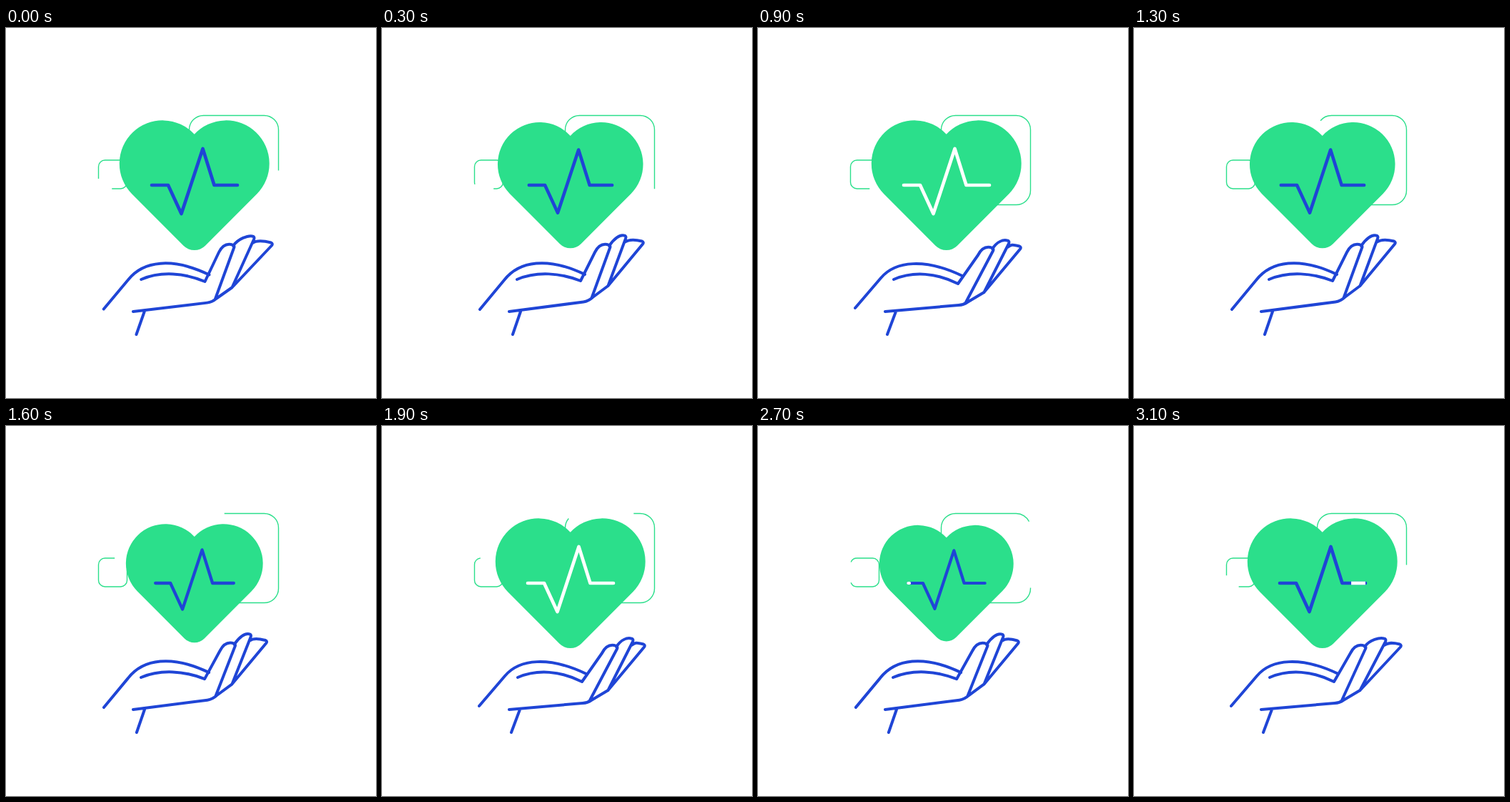
Recreate the animation shown at these times as an HTML page. Size 518x518 px, loop 3.2 s.

```html
<!DOCTYPE html>
<html lang="en">
<head>
<meta charset="utf-8">
<title>Heart in hand</title>
<style>
  html, body { margin: 0; width: 100%; height: 100%; overflow: hidden; background: #fff; }
  svg { display: block; width: 100%; height: 100%; }
  path { fill: none; stroke-linecap: round; stroke-linejoin: round; }
  .frame { stroke: #2bdf8b; stroke-width: 1.4; stroke-dasharray: 80 20; stroke-linecap: butt; }
  #shape { fill: #2bdf8b; }
  .pulse { stroke-width: 4.7; }
  #pulse, #hand { stroke: #1f45d6; }
  #glow { stroke: #fff; }
  #hand { stroke-width: 4; }
</style>
</head>
<body>
<svg viewBox="0 0 518 518">
  <path id="big" class="frame" pathLength="100"
    d="M256.5 142.5a20 20 0 0 1 20-20h85a20 20 0 0 1 20 20v85a20 20 0 0 1-20 20h-85a20 20 0 0 1-20-20z"/>
  <path id="small" class="frame" pathLength="100"
    d="M138.5 185a9 9 0 0 0-9 9v22a9 9 0 0 0 9 9h22a9 9 0 0 0 9-9v-22a9 9 0 0 0-9-9z"/>
  <g id="heart">
    <path id="shape" d="M263.75 148.8A60.5 60.5 0 1 0 176.2 232.3L248.5 304.7A21.5 21.5 0 0 0 279 304.7L351.3 232.3A60.5 60.5 0 1 0 263.75 148.8z"/>
    <path id="pulse" class="pulse" d="M204 220H227L245.5 260L275.5 169L291.5 220H324"/>
    <path id="glow" class="pulse" pathLength="100" d="M204 220H227L245.5 260L275.5 169L291.5 220H324"/>
  </g>
  <path id="hand"/>
</svg>
<script>
const LOOP = 3200, STEP = 100;
const $ = id => document.getElementById(id);
const mix = (a, b, k) => a + (b - a) * k;

// Keys are [time, ...values]; linear between keys, held outside them.
function track(keys, t) {
  let i = keys.findIndex(key => key[0] > t);
  if (i < 0) return keys[keys.length - 1].slice(1);
  if (i === 0) return keys[0].slice(1);
  const a = keys[i - 1], b = keys[i], k = (t - a[0]) / (b[0] - a[0]);
  return a.slice(1).map((v, n) => mix(v, b[n + 1], k));
}

const SCALE = [[0, .895], [100, .965], [200, 1], [490, 1], [600, .97], [1000, .895]];
const HEAD = [[0, .8], [200, 100]];
const TAIL = [[200, 0], [400, 92], [430, 100]];
// Palm bend, then the x, y of three fingertips.
const POSE = [
  [0, .05, 321, 309, 343, 295, 365, 302],
  [200, 1, 329, 312, 351, 301, 368, 307],
  [400, 1, 324, 312, 352, 301, 374, 307],
  [450, .25, 319, 308, 347, 295, 373, 302],
  [600, 0, 319, 308, 341, 294, 366, 300],
  [1000, .05, 321, 309, 343, 295, 365, 302]
];

// Beats start at 700, 1700 and 2700; the rest after the third is 200 ms longer.
function beatTime(t) {
  if (t >= 700 && t < 2700) return (t - 700) % 1000;
  const u = (t + LOOP - 2700) % LOOP;
  return u < 400 ? u : u < 800 ? 400 + (u - 400) / 2 : u - 200;
}

// Share of a full turn: constant speed with short ramps at both ends.
function turn(t) {
  const up = 270, down = 150, speed = 1 / (LOOP - (up + down) / 2), left = LOOP - t;
  if (t < up) return speed * t * t / (2 * up);
  if (left < down) return 1 - speed * left * left / (2 * down);
  return speed * (t - up / 2);
}

function handPath([bend, x1, y1, x2, y2, x3, y3]) {
  const p = (ax, ay, bx, by) => `${mix(ax, bx, bend)} ${mix(ay, by, bend)} `;
  const at = (x, y) => (dx, dy) => `${x + dx} ${y + dy} `;
  const f1 = at(x1, y1), f2 = at(x2, y2), f3 = at(x3, y3);
  const knuckle = p(316.5, 361, 316.5, 370);
  return 'M' + p(137, 394, 136, 392) + 'L' + p(171, 353, 172, 350) +
    'C' + p(192, 326, 192, 326) + p(232, 320, 234, 322) + p(284, 345, 286, 347) +
    'M' + p(189, 352, 190, 352) + 'C' + p(217, 340, 218, 340) + p(250, 343, 250, 343) + p(278, 354, 280, 358) +
    'L' + f1(-21, 6) + 'C' + f1(-16, -4) + f1(-10, -6) + f1(-4, -5) + 'Q' + f1(2, -4) + f1(0, 0) +
    'L' + p(293.5, 378, 291, 384) +
    'M' + f1(-1, -3) + 'C' + f1(6, -13) + f2(-8, -5) + f2(-2, -3.5) + 'Q' + f2(1.5, -3) + f2(0, 1) +
    'L' + knuckle +
    'M' + f2(-1.5, 6) + 'C' + f2(4, 2) + f3(-12, -4) + f3(-2, -1.5) + 'Q' + f3(1, 0) + f3(-1, 2.5) +
    'L' + knuckle + 'L' + p(295, 377, 293, 384) + 'Q' + p(289, 382.5, 288, 387.5) + p(282, 383.5, 281, 388) +
    'L178 397M' + p(194, 397, 193, 397) + 'L' + p(183, 429, 181, 429);
}

function draw(t) {
  const u = beatTime(t), spin = turn(t) * 100;
  $('big').style.strokeDashoffset = -(64 + spin);
  $('small').style.strokeDashoffset = -(41.5 + spin);

  $('heart').setAttribute('transform', `translate(264 220) scale(${track(SCALE, u)[0]}) translate(-264 -220)`);

  const [head] = track(HEAD, u), [tail] = track(TAIL, u);
  const glow = $('glow').style;
  glow.visibility = tail < 100 ? 'visible' : 'hidden';
  glow.strokeDasharray = `0 ${tail} ${head - tail} 200`;
  glow.strokeLinecap = tail > 0 ? 'butt' : 'round';
  $('pulse').style.visibility = head === 100 && tail === 0 ? 'hidden' : 'visible';

  $('hand').setAttribute('d', handPath(track(POSE, u)));
}

const start = performance.now();
function tick() {
  const t = (performance.now() - start) % LOOP;
  draw(Math.floor(t / STEP) * STEP);
  requestAnimationFrame(tick);
}
tick();
</script>
</body>
</html>
```
